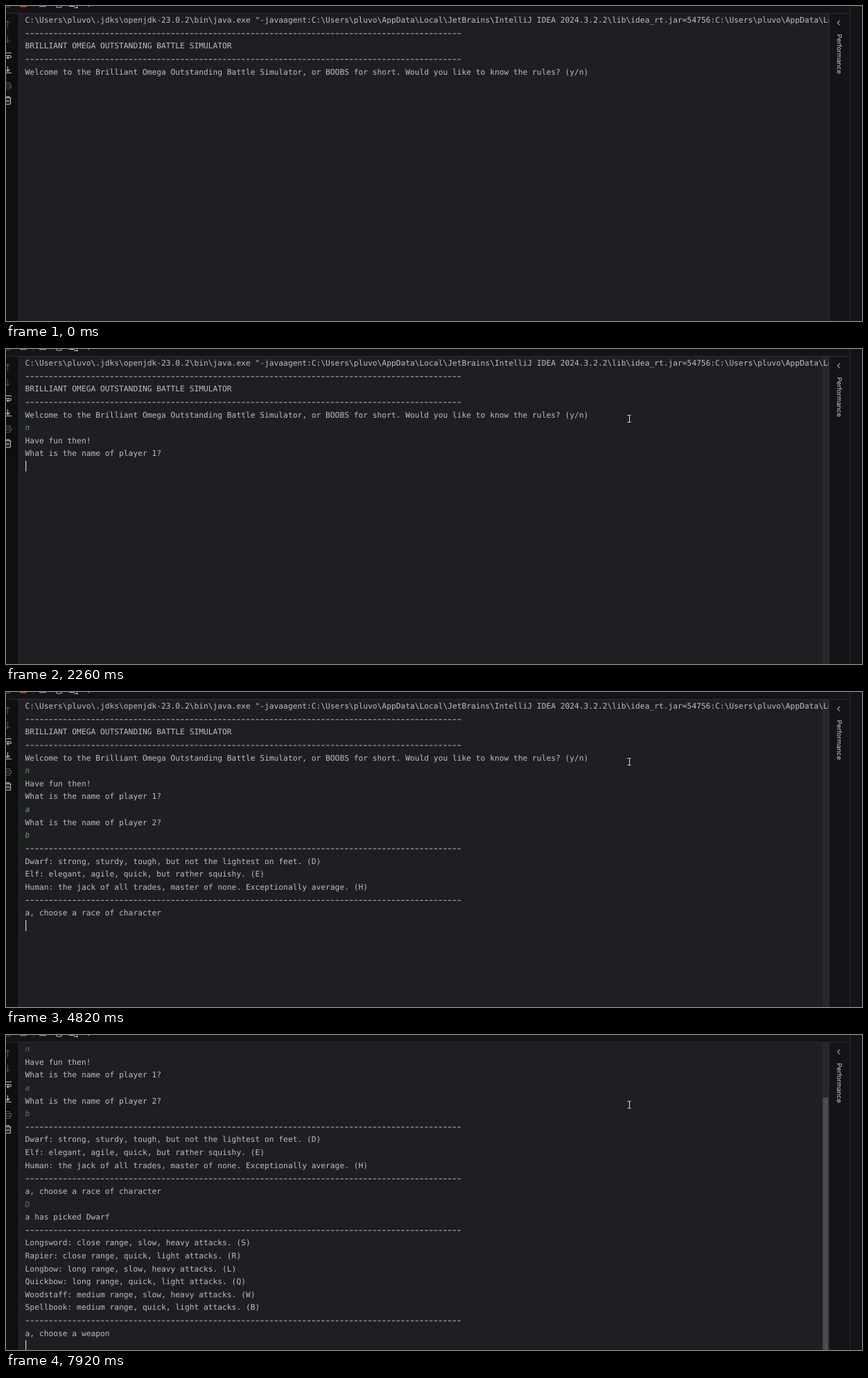
Recreate the animation shown at these times as an HTML page with a canvas. Size 1235 by 454 pixels, loop 8 s.

```html
<!DOCTYPE html>
<html lang="en">
<head>
<meta charset="utf-8">
<title>Battle simulator console</title>
<style>
html, body { margin: 0; width: 100%; height: 100%; overflow: hidden; background: #1e1f22; }
canvas { display: block; }
</style>
</head>
<body>
<canvas id="stage" width="1235" height="454"></canvas>
<script>
const ctx = document.getElementById('stage').getContext('2d');
const LOOP = 8000;
const LEFT = 27.6, FIRST_ROW = 20.2, ROW = 18.61, COL = 6.77;
const SCROLL_AT = 6510, SCROLL_ROWS = 5;
const MONO = '11.25px "DejaVu Sans Mono", monospace';
const TEXT = '#bcbec4', GREEN = '#649f6c', GREY = '#6b6d70';
const RULE = '-'.repeat(93);

// Each block: time it appears, its lines, and whether the player typed it.
const blocks = [
  [0, [
    'C:\\Users\\pluvo\\.jdks\\openjdk-23.0.2\\bin\\java.exe "-javaagent:C:\\Users\\pluvo\\AppData\\Local\\JetBrains\\IntelliJ IDEA 2024.3.2.2\\lib\\idea_rt.jar=54756:C:\\Users\\pluvo\\AppData\\Local',
    RULE,
    'BRILLIANT OMEGA OUTSTANDING BATTLE SIMULATOR',
    RULE,
    'Welcome to the Brilliant Omega Outstanding Battle Simulator, or BOOBS for short. Would you like to know the rules? (y/n)',
  ]],
  [1700, ['n'], true],
  [2260, ['Have fun then!', 'What is the name of player 1?']],
  [2820, ['a'], true],
  [3750, ['What is the name of player 2?']],
  [4200, ['b'], true],
  [4820, [
    RULE,
    'Dwarf: strong, sturdy, tough, but not the lightest on feet. (D)',
    'Elf: elegant, agile, quick, but rather squishy. (E)',
    'Human: the jack of all trades, master of none. Exceptionally average. (H)',
    RULE,
    'a, choose a race of character',
  ]],
  [5800, ['D'], true],
  [SCROLL_AT, [
    'a has picked Dwarf',
    RULE,
    'Longsword: close range, slow, heavy attacks. (S)',
    'Rapier: close range, quick, light attacks. (R)',
    'Longbow: long range, slow, heavy attacks. (L)',
    'Quickbow: long range, quick, light attacks. (Q)',
    'Woodstaff: medium range, slow, heavy attacks. (W)',
    'Spellbook: medium range, quick, light attacks. (B)',
    RULE,
    'a, choose a weapon',
  ]],
];

// Time, row, column; no row means the caret is hidden.
const carets = [
  [0], [1020, 4, 121], [1700, 5, 1], [2260, 8, 0], [2820, 8, 1], [3390],
  [3570, 9, 0], [3750, 10, 0], [4200, 10, 1], [4820, 17, 0], [5450],
  [5800, 17, 1], [6440], [SCROLL_AT, 28, 0], [7430], [7920, 28, 0],
];

function rect(color, x, y, w, h) {
  ctx.fillStyle = color;
  ctx.fillRect(x, y, w, h);
}

function stroke(color, path, width = 1) {
  ctx.strokeStyle = color;
  ctx.lineWidth = width;
  ctx.stroke(new Path2D(path));
}

function drawLine(text, y, color, italic) {
  if (text === RULE) {
    for (let i = 0; i < RULE.length; i++) rect(TEXT, LEFT + i * COL + 1.2, y + 0.5, 4.3, 1);
    return;
  }
  ctx.font = (italic ? 'italic ' : '') + MONO;
  ctx.fillStyle = color;
  ctx.fillText(text, LEFT, y + 4);
}

function drawTranscript(t) {
  const scroll = t >= SCROLL_AT ? SCROLL_ROWS : 0;
  const rowY = row => FIRST_ROW + (row - scroll) * ROW;
  const inputColor = t >= SCROLL_AT || t < 2260 ? GREY : GREEN;
  let row = 0;
  for (const [time, lines, typed] of blocks) {
    if (t < time) break;
    for (const line of lines) drawLine(line, rowY(row++), typed ? inputColor : TEXT, typed);
  }
  const [, caretRow, col] = carets.findLast(c => c[0] <= t);
  if (caretRow !== undefined) {
    rect('#ced0d6', Math.floor(28 + col * COL), Math.round(rowY(caretRow) - 7.74), 1.2, 15.5);
  }
}

function drawPointer(t) {
  if (t < 300) return;
  const step = Math.floor((t - 300) / 65.45);
  const p = Math.min(1, step / 10);

  ctx.globalAlpha = Math.min(1, (step + 1) / 5);
  rect('rgba(255,255,255,0.04)', 1178, 11, 9, 443);
  ctx.globalAlpha = 1;
  if (t >= SCROLL_AT) rect('#4c4d50', 1178.5, 90, 7.5, 364);

  const u = (1 - p) ** 2;
  const x = Math.round(899 + 284 * u), y = Math.round(100 + 318 * u ** 1.3);
  stroke('#e2e3e5', `M${x - 2.5} ${y - 4.5}h2l.5.5.5-.5h2M${x + .5} ${y - 4}v9M${x - 2.5} ${y + 5.5}h2l.5-.5.5.5h2`);
}

function drawFrame() {
  rect('#131417', 0, 0, 1235, 10);
  rect('#0e0f11', 0, 11, 18, 443);
  rect('#131417', 1188, 10, 47, 444);
  rect('#2b2d30', 0, 10, 1217, 1);
  rect('#2b2d30', 18, 10, 1, 444);
  rect('#2b2d30', 1187, 10, 1, 444);
  rect('#2b2d30', 1217, 0, 1, 454);

  // Toolbar icons, cut by the top edge
  const bright = '#bfc1c6', dim = '#56585c';
  stroke(dim, 'M1 1.5h4l2-1.5');
  rect('#b56b43', 20, 0, 10, 1.3);
  rect('#303236', 39, 0, 1, 4);
  rect('#8b9bab', 48, 0, 10, 1.2);
  stroke(bright, 'M72.5 0v1q0 1 1 1h6q1 0 1-1v-1M91 .5h8M98 2.5h6M102.5 0v3');
  rect(bright, 118.5, 0, 1.5, 1);

  // Side icons, cut by the left edge
  stroke(dim, 'M2.5 32v-11M-1 25l3.5-3.5 3.5 3.5');
  stroke(dim, 'M2.5 43v10M-1 49.5l3.5 3.5 3.5-3.5');
  stroke(bright, 'M0 67.5h8M0 71.5h5.5q2 0 2 1.5t-2 1.5h-4M3.5 72.5l-2 2 2 2', 1.1);
  stroke(bright, 'M2.5 87v7M-.5 91.5l3 3 3-3M0 96.5h8', 1.1);
  stroke(dim, 'M0 110.5h5.5v3M0 113.5h7.5v4h-2M0 116.5h5.5v3.5h-5.5');
  stroke(bright, 'M0 132.5h7.5M1 132v-1.5h3.5v1.5M6.5 133v7.5q0 1-1 1h-5.5M1.5 135v4M4 135v4', 1.1);

  stroke('#a7a9ae', 'M1203 21l-3.3 3.3 3.3 3.3', 1.1);
  ctx.save();
  ctx.translate(1198.5, 40.5);
  ctx.rotate(Math.PI / 2);
  ctx.font = '9.4px Inter, sans-serif';
  ctx.fillStyle = '#d0d2d7';
  ctx.fillText('Performance', 0, 0);
  ctx.restore();
}

function draw(t) {
  rect('#1e1f22', 0, 0, 1235, 454);
  ctx.save();
  ctx.beginPath();
  ctx.rect(19, 11, 1168, 443);
  ctx.clip();
  drawTranscript(t);
  drawPointer(t);
  ctx.restore();
  drawFrame();
}

ctx.textRendering = 'geometricPrecision';
const start = performance.now();
function tick() {
  draw((performance.now() - start) % LOOP);
  requestAnimationFrame(tick);
}
tick();
</script>
</body>
</html>
```
